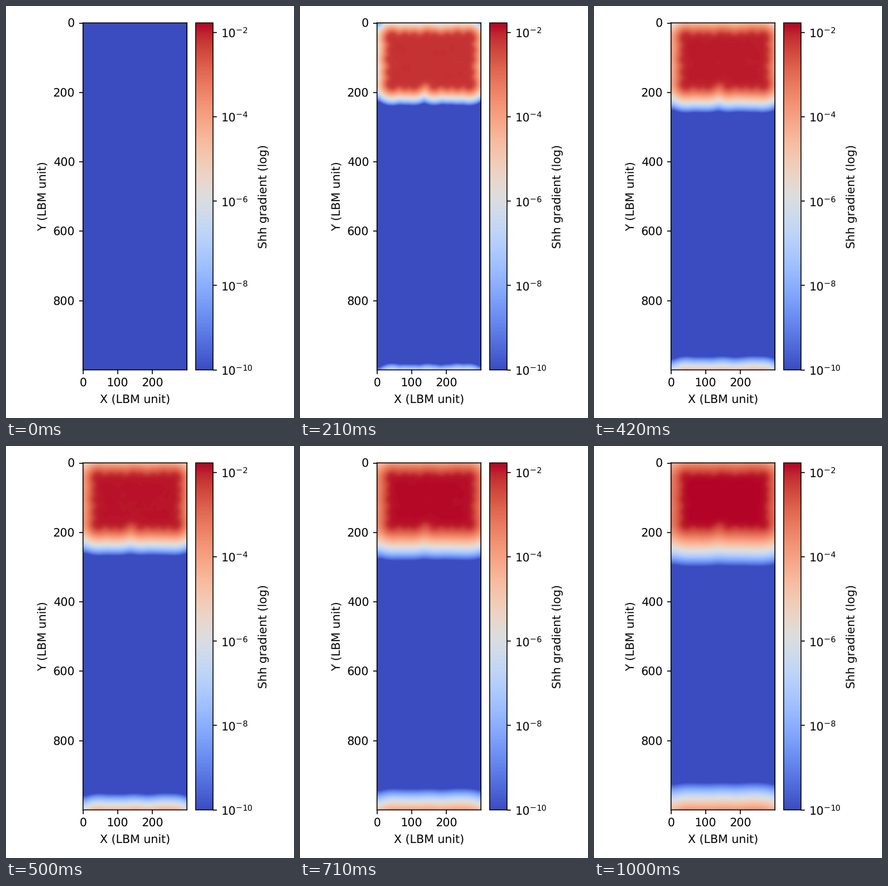
A matplotlib script that plays this animation: 500x714 px, repeating every 1080 ms.

```python
import numpy as np
import matplotlib.pyplot as plt
from matplotlib.animation import FuncAnimation
from matplotlib.colors import LogNorm

W, H, DPI = 500, 714, 144
NX, NY = 300, 1000
TICK, LOOP = 10, 1080                       # ms
SHORT, LONG = 80, 130                       # ms, the two lengths of a hold
HOLDS = [SHORT, LONG] * 2 + [SHORT] * 2 + [LONG, SHORT] * 2
STEPS = np.cumsum(HOLDS)
DIFF, TAU, PEAK = 25.0, 4.5, 0.0188         # per step
VMIN, VMAX = 1e-10, 0.0168
X0, X1, Y0, Y1 = 27, 279, 28, 190           # tissue outline
R, INSET, GAP = 15, 8, 32                   # cell radius, bay depth, cell spacing
NOTCH = (139, 186)

plt.rcParams.update({"font.family": "DejaVu Sans", "font.size": 9.92,
                     "text.hinting": "none", "path.snap": False})


def source_map():
    """Tissue that secretes: a block with a rim of round cells and one notch."""
    rng = np.random.default_rng(4)
    y, x = np.mgrid[:NY, :NX]

    def disc(cx, cy, r):
        return (x - cx) ** 2 + (y - cy) ** 2 < r * r

    def spread(a, b):
        pos = np.linspace(a + R, b - R, round((b - a - 2 * R) / GAP) + 1)
        pos[1:-1] += rng.uniform(-6, 6, len(pos) - 2)
        return pos

    def depth():
        return R + rng.uniform(-1, 3)

    mask = ((x > X0 + INSET) & (x < X1 - INSET)
            & (y > Y0 + INSET) & (y < Y1 - INSET))
    for cx in spread(X0, X1):
        mask |= disc(cx, Y0 + depth(), R) | disc(cx, Y1 - depth(), R)
    for cy in spread(Y0, Y1):
        mask |= disc(X0 + depth(), cy, R) | disc(X1 - depth(), cy, R)
    mask &= ~disc(*NOTCH, R)
    grain = rng.normal(1, 0.05, (NY // 10, NX // 10))
    return mask * np.kron(grain, np.ones((10, 10)))


def spectrum():
    ky = 2 * np.pi * np.fft.fftfreq(NY)[:, None]
    kx = 2 * np.pi * np.fft.rfftfreq(NX)[None, :]
    rate = 1 / TAU + DIFF * (4 - 2 * np.cos(kx) - 2 * np.cos(ky))
    return np.fft.rfft2(source_map()) * PEAK / TAU, rate


def field(step):
    """Concentration of the decaying, diffusing, periodic signal."""
    c = np.fft.irfft2(SRC * (1 - np.exp(-RATE * step)) / RATE, s=(NY, NX))
    return np.maximum(c, VMIN)


def px_axes(x0, y0, x1, y1):
    return fig.add_axes([x0 / W, 1 - y1 / H, (x1 - x0) / W, (y1 - y0) / H])


SRC, RATE = spectrum()
fields = [field(k) for k in range(len(STEPS) + 1)]

fig = plt.figure(figsize=(W / DPI, H / DPI), dpi=DPI, facecolor="white")
ax = px_axes(133.7, 29.3, 314.1, 630.6)
img = ax.imshow(fields[0], cmap="coolwarm", norm=LogNorm(VMIN, VMAX), aspect="auto")
ax.set_xticks([0, 100, 200])
ax.set_yticks(range(0, NY, 200))
ax.set_xlabel("X (LBM unit)")
ax.set_ylabel("Y (LBM unit)")

cax = px_axes(329.3, 29.3, 359.4, 630.6)
bar = fig.colorbar(img, cax=cax, ticks=[10.0 ** e for e in range(-10, 0, 2)])
bar.minorticks_off()
bar.set_label("Shh gradient (log)")


def update(n):
    img.set_data(fields[np.searchsorted(STEPS, n * TICK, side="right")])
    return [img]


anim = FuncAnimation(fig, update, frames=LOOP // TICK, interval=TICK,
                     repeat=True, repeat_delay=0, blit=False)
plt.show()
```
